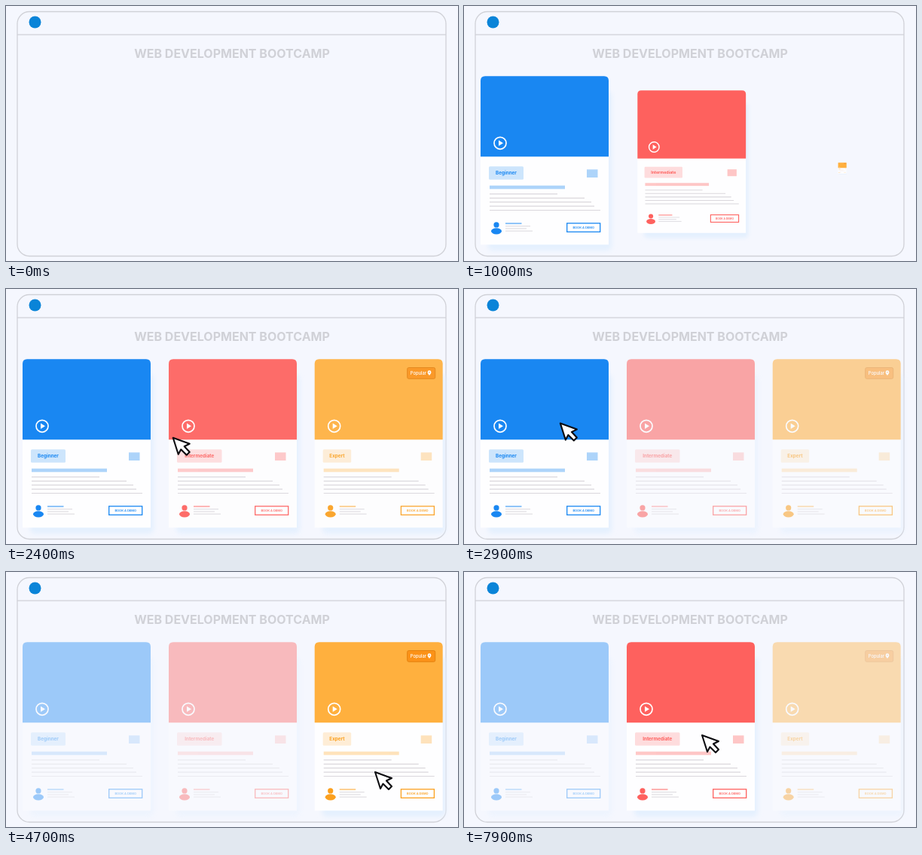
An HTML page that plays this animation: 600x339 px, repeating every 8000 ms.

```html
<!DOCTYPE html>
<html lang="en">
<head>
<meta charset="utf-8">
<title>Web development bootcamp</title>
<style>
  html, body { margin: 0; width: 100%; height: 100%; overflow: hidden; background: #f5f7fe; }
  svg { display: block; width: 100vw; height: 100vh; font-family: Inter, "Open Sans", sans-serif; }
</style>
</head>
<body>
<svg viewBox="0 0 600 339">
  <defs>
    <filter id="soft" x="-20%" y="-20%" width="140%" height="140%"><feGaussianBlur stdDeviation="3"/></filter>
  </defs>
  <rect width="600" height="339" fill="#f5f7fe"/>
  <g fill="none" stroke="#d0d1d7" stroke-width="1.3">
    <rect x="15" y="7.5" width="569" height="325" rx="16"/>
    <path d="M15 38.2H584"/>
  </g>
  <circle cx="38.5" cy="21.5" r="8" fill="#0a84d8"/>
  <text x="300" y="69" text-anchor="middle" font-size="16" font-weight="700" fill="#d0d1d7">WEB DEVELOPMENT BOOTCAMP</text>
  <g id="cards"></g>
  <path id="cursor" d="M0 0L22 8L15 11.5L22 19L18 23L10.5 15.5L7 22Z" transform="translate(1 1)"
        fill="#fff" stroke="#0b0b0f" stroke-width="2.1" stroke-linejoin="round"/>
</svg>
<script>
const LOOP = 8000, DIM = 0.4, FADE = 800;
const ANCHOR = { x: 93, y: 123 };

const cards = [
  { label: 'Beginner', color: '#1987f2', x: 22, tag: 46, start: 80 },
  { label: 'Intermediate', color: '#fe615e', x: 216, tag: 59.5, start: 480 },
  { label: 'Expert', color: '#ffb03e', ink: '#fba01f', x: 409.7, tag: 37.5, start: 880 },
];

// Which card is highlighted from a given time on (-1: all of them).
const hovers = [[0, -1], [2300, 0], [3880, 2], [6860, 1]];

// Cursor stops: time, x, y and the easing used to get there.
const linear = p => p;
const easeOut = p => 1 - (1 - p) ** 2;
const stops = [
  [2050, 316, 217, linear],
  [3640, 76, 168, easeOut],
  [4690, 490, 266, linear],
  [5940, 490, 266, linear],
  [7900, 316, 217, linear],
];

const clamp = v => Math.min(1, Math.max(0, v));
const mix = (a, b, p) => a + (b - a) * p;

// Cubic bezier (.36, 0, .38, 1), solved by bisection.
function popEase(x) {
  let lo = 0, hi = 1;
  for (let i = 0; i < 24; i++) {
    const u = (lo + hi) / 2, v = 1 - u;
    if (3 * v * v * u * 0.36 + 3 * v * u * u * 0.38 + u ** 3 < x) lo = u; else hi = u;
  }
  return x >= 1 ? 1 : lo * lo * (3 - 2 * lo);
}

const line = (x1, x2, y, color, width) =>
  `<path d="M${x1} ${y}H${x2}" stroke="${color}" stroke-width="${width}"/>`;

const badge = `
  <rect x="123" y="11.2" width="37" height="14.8" rx="2" fill="#fb9218" stroke="#e4820f"/>
  <text x="127" y="21.2" font-size="5.8" font-weight="500" fill="#fff">Popular</text>
  <path d="M152.3 21.8C151 20 149.9 18.6 149.9 17.4A2.4 2.4 0 0 1 154.7 17.4C154.7 18.6 153.6 20 152.3 21.8Z" fill="#fff"/>
  <circle cx="152.3" cy="17.4" r=".8" fill="#fb9218"/>`;

function cardMarkup({ label, color, ink = color, tag }) {
  const grey = '#dad7dc';
  const body = [102, 138, 147, 151, 159].map((end, i) => line(12, end, 156.6 + i * 5.4, grey, 1.2));
  const bio = [66, 61, 69].map((end, i) => line(33, end, 199.4 + i * 3.2, grey, 1));
  return `
    <rect x="10" y="20" width="164" height="212" rx="6" fill="#e4f0fe" filter="url(#soft)"/>
    <path d="M0 100H170V224H0Z" fill="#fefeff"/>
    <path d="M0 107V6Q0 0 6 0H164Q170 0 170 6V107Z" fill="${color}"/>
    <circle cx="26" cy="89" r="8" fill="none" stroke="#fff" stroke-width="1.7"/>
    <path d="M24 85.2L30 89L24 92.8Z" fill="#fff"/>
    <rect x="11" y="120" width="${tag}" height="17.5" rx="1.5" fill="${color}" opacity=".21"/>
    <text x="${11 + tag / 2}" y="131.2" text-anchor="middle" font-size="6.3" font-weight="700" fill="${ink}">${label}</text>
    <g fill="${color}" opacity=".35">
      <rect x="141" y="124" width="14.5" height="10.7"/>
      <rect x="12" y="145.4" width="100" height="4.6"/>
    </g>
    ${body.join('')}
    <g fill="${ink}">
      <circle cx="21" cy="197.6" r="3.6"/>
      <ellipse cx="21" cy="206" rx="7" ry="4.1"/>
    </g>
    <g opacity=".5">${line(33, 54.5, 195.8, ink, 2)}</g>
    ${bio.join('')}
    <rect x="114.7" y="195.5" width="44" height="11.5" fill="none" stroke="${ink}" stroke-width="1.3"/>
    <text x="136.7" y="202.7" text-anchor="middle" font-size="4" font-weight="600" fill="${ink}">BOOK A DEMO</text>
    ${label === 'Expert' ? badge : ''}`;
}

const layer = document.getElementById('cards');
layer.innerHTML = cards.map(c => `<g>${cardMarkup(c)}</g>`).join('');
cards.forEach((c, i) => c.node = layer.children[i]);
const cursor = document.getElementById('cursor');

function cardOpacity(index, t) {
  let value = 1;
  for (const [time, active] of hovers) {
    const goal = active < 0 || active === index ? 1 : DIM;
    value = mix(value, goal, clamp((t - time) / FADE));
  }
  return value;
}

function cursorAt(t) {
  let [, x, y] = stops[0];
  for (let i = 1; i < stops.length; i++) {
    const [from] = stops[i - 1], [to, nx, ny, ease] = stops[i];
    const p = ease(clamp((t - from) / (to - from)));
    x = mix(x, nx, p);
    y = mix(y, ny, p);
  }
  return [x, y];
}

function draw(now) {
  const t = now % LOOP;
  cards.forEach((c, i) => {
    const s = popEase(clamp((t - c.start) / 820));
    const x = c.x + ANCHOR.x * (1 - s), y = 93.3 + ANCHOR.y * (1 - s);
    c.node.setAttribute('transform', `translate(${x} ${y}) scale(${s})`);
    c.node.setAttribute('opacity', cardOpacity(i, t));
  });
  const [x, y] = cursorAt(t);
  cursor.setAttribute('transform', `translate(${x} ${y})`);
  cursor.setAttribute('opacity', clamp((t - 2050) / 150));
  requestAnimationFrame(draw);
}
draw(0);
</script>
</body>
</html>
```
